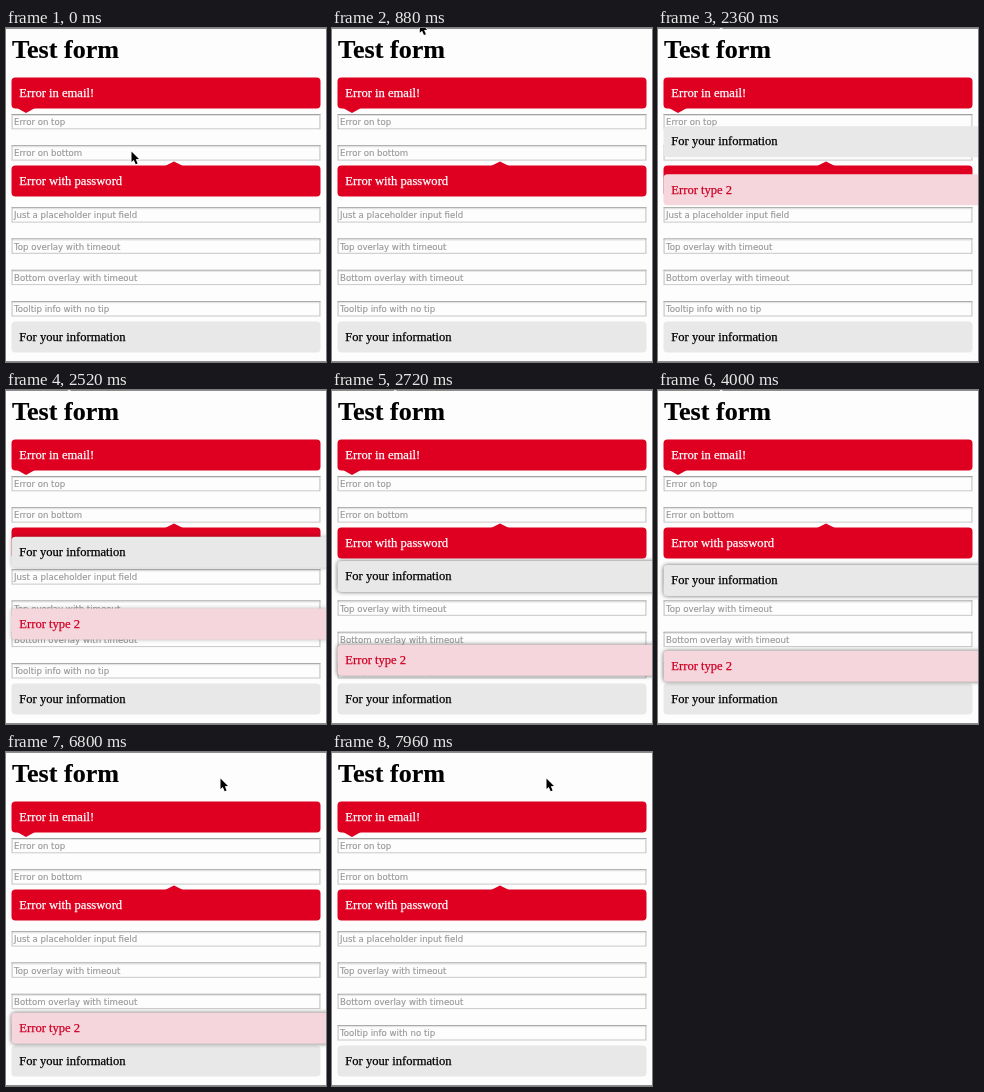
Animation, 320 px wide and 334 px high, one loop 8 s. Source, as an HTML page with a canvas:

```html
<!DOCTYPE html>
<html lang="en">
<head>
<meta charset="utf-8">
<title>Test form</title>
<style>
  html, body { margin: 0; width: 100%; height: 100%; overflow: hidden; background: #fdfdfd; }
  canvas { display: block; width: 320px; height: 334px; }
</style>
</head>
<body>
<canvas id="stage"></canvas>
<script>
const W = 320, H = 334, LOOP = 8000;
const SERIF = '"Liberation Serif", "Times New Roman", serif';
const SANS = '"DejaVu Sans", sans-serif';
const RED = '#df0021', GREY = '#e8e8e8';

const canvas = document.getElementById('stage');
const ctx = canvas.getContext('2d');
const ratio = window.devicePixelRatio || 1;
canvas.width = W * ratio;
canvas.height = H * ratio;
ctx.scale(ratio, ratio);

const fields = [
  [86, 'Error on top'],
  [117.3, 'Error on bottom'],
  [179.3, 'Just a placeholder input field'],
  [210.5, 'Top overlay with timeout'],
  [241.8, 'Bottom overlay with timeout'],
  [273.2, 'Tooltip info with no tip']
];

const overlays = [
  { y: 175, text: 'For your information', fill: GREY, ink: '#000', hide: 4620 },
  { y: 260.7, text: 'Error type 2', fill: '#f5d6dc', ink: '#d00027', hide: 7120 }
];
const SHOW = 2116, SLIDE = 750, FADE = 200;

// Pointer tip: time, x, y
const pointerPath = [
  [0, 125, 123], [800, 88, -6], [1680, 58, -13], [4900, 58, -13],
  [5320, 67, -12], [5960, 177, 32], [6600, 214, 26], [LOOP, 214, 26]
];

const clamp = v => Math.min(1, Math.max(0, v));
const mix = (a, b, k) => a + (b - a) * k;
const smooth = k => k * k * (3 - 2 * k);

// cubic-bezier(.25, .1, .25, 1)
function ease(p) {
  if (p <= 0 || p >= 1) return clamp(p);
  const curve = (u, a, b) => 3 * u * (1 - u) * (1 - u) * a + 3 * u * u * (1 - u) * b + u ** 3;
  let lo = 0, hi = 1;
  for (let i = 0; i < 24; i++) {
    const mid = (lo + hi) / 2;
    if (curve(mid, .25, .25) < p) lo = mid; else hi = mid;
  }
  return curve(lo, .1, 1);
}

// The thin stroke gives the slightly heavy look of smoothed type
function text(str, x, y, font, color, weight) {
  ctx.font = font;
  ctx.fillStyle = ctx.strokeStyle = color;
  ctx.lineWidth = weight;
  ctx.lineJoin = 'round';
  ctx.fillText(str, x, y);
  ctx.strokeText(str, x, y);
}

function rect(x, y, w, h, color) {
  ctx.fillStyle = color;
  ctx.fillRect(x, y, w, h);
}

function polygon(points, color) {
  ctx.fillStyle = color;
  ctx.beginPath();
  points.forEach(([x, y]) => ctx.lineTo(x, y));
  ctx.closePath();
  ctx.fill();
}

function panel(x, y, w, h, fill) {
  ctx.fillStyle = fill;
  ctx.beginPath();
  ctx.roundRect(x, y, w, h, 4);
  ctx.fill();
}

const label = (str, y, ink) => text(str, 13.3, y, `12.6px ${SERIF}`, ink, .25);

function message(y, str, fill, ink) {
  panel(5.5, y - .5, 309, 31, fill);
  label(str, y + 19, ink);
}

function field(y, hint) {
  rect(5.5, y, 309, 15.3, '#c8c8c8');
  rect(5.5, y, 309, 1, '#a2a2a2');
  rect(6.7, y + 1, 306.6, 13.3, '#fdfdfd');
  rect(6.7, y + 1, 306.6, 1, '#e2e2e2');
  text(hint, 8, y + 11, `8.6px ${SANS}`, '#989898', .15);
}

function drawPage() {
  rect(0, 0, W, H, '#fdfdfd');
  rect(0, 0, W, 1, '#8c8c8c');
  rect(0, H - 1, W, 1, '#8c8c8c');
  text('Test form', 6, 30, `bold 26.1px ${SERIF}`, '#000', .2);
  fields.forEach(([y, hint]) => field(y, hint));
  message(50, 'Error in email!', RED, '#fff');
  polygon([[11, 80], [29, 80], [20, 85]], RED);
  message(138, 'Error with password', RED, '#fff');
  polygon([[159, 138], [177, 138], [168, 133.5]], RED);
  message(294, 'For your information', GREY, '#000');
}

function drawOverlay(o, t) {
  if (t < SHOW || t >= o.hide + FADE) return;
  const p = clamp((t - SHOW) / SLIDE);
  const y = o.y * ease(p);
  const shade = clamp((p - .35) / .4);
  ctx.save();
  ctx.globalAlpha = 1 - clamp((t - o.hide) / FADE);
  ctx.shadowColor = `rgba(0, 0, 0, ${.6 * shade})`;
  ctx.shadowBlur = 4 * ratio;
  panel(5.5, y, 325, 31, o.fill);
  ctx.shadowColor = 'transparent';
  label(o.text, y + 19.2, o.ink);
  ctx.restore();
}

function drawPointer(t) {
  const i = pointerPath.findIndex(k => k[0] > t);
  const [t0, x0, y0] = pointerPath[i - 1];
  const [t1, x1, y1] = pointerPath[i];
  const k = smooth((t - t0) / (t1 - t0));
  ctx.save();
  ctx.translate(mix(x0, x1, k), mix(y0, y1, k));
  const arrow = [[.5, .5], [.5, 11], [2.8, 8.9], [4.7, 13.2], [6.6, 12.4], [4.8, 8.2], [8, 8]];
  ctx.strokeStyle = '#fff';
  ctx.lineWidth = 1.6;
  ctx.lineJoin = 'round';
  polygon(arrow, '#000');
  ctx.stroke();
  polygon(arrow, '#000');
  ctx.restore();
}

function frame(now) {
  const t = now % LOOP;
  drawPage();
  overlays.forEach(o => drawOverlay(o, t));
  drawPointer(t);
}

let start = null;
function tick(now) {
  if (start === null) start = now;
  frame(Math.max(0, now - start));
  requestAnimationFrame(tick);
}
frame(0);
requestAnimationFrame(tick);
</script>
</body>
</html>
```
